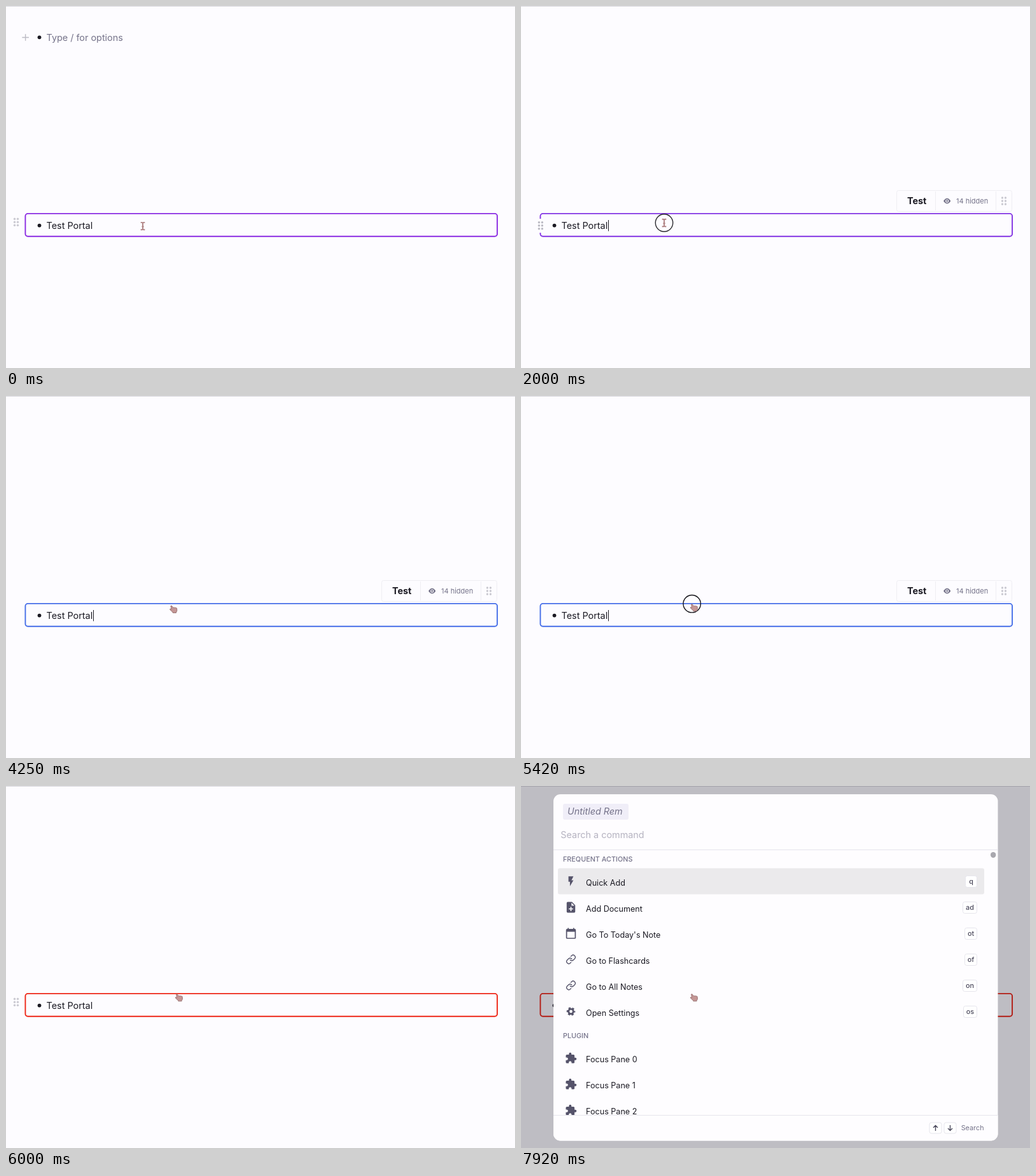
An HTML page that plays this animation: 800 by 570 pixels, repeating every 8 s.

```html
<!DOCTYPE html>
<html lang="en">
<head>
<meta charset="utf-8">
<style>
  html, body { margin: 0; width: 100%; height: 100%; overflow: hidden; background: #fdfcff; }
  svg { display: block; width: 800px; height: 570px; }
  text { font: 14.4px Inter, sans-serif; fill: #1b1a23; white-space: pre; }
  .row { font-size: 12.6px; }
  .small { font-size: 10.8px; fill: #75738a; }
  .head { font-size: 10.8px; font-weight: 500; fill: #75738a; }
  .key { font-size: 10.8px; font-weight: 500; fill: #4b495c; text-anchor: middle; }
  .box { fill: #fff; stroke: #e6e5ec; }
  .line { stroke: #e6e5ec; }
  .caret { stroke: #1b1a23; stroke-width: 1; }
  .icon { fill: #55536a; }
  .stroke { fill: none; stroke: #55536a; stroke-width: 2; stroke-linecap: round; }
</style>
</head>
<body>
<svg viewBox="0 0 800 570">
  <defs>
    <g id="dots">
      <circle cx="-2.5" cy="-5" r="1.7"/><circle cx="2.5" cy="-5" r="1.7"/>
      <circle cx="-2.5" r="1.7"/><circle cx="2.5" r="1.7"/>
      <circle cx="-2.5" cy="5" r="1.7"/><circle cx="2.5" cy="5" r="1.7"/>
    </g>
    <path id="bolt" class="icon" d="M7 2V13H10V22L17 10H13L17 2Z"/>
    <path id="doc" class="icon" d="M14 2H6a2 2 0 0 0-2 2v16a2 2 0 0 0 2 2h12a2 2 0 0 0 2-2V8zm2 14h-3v3h-2v-3H8v-2h3v-3h2v3h3zm-3-7V3.5L18.5 9z"/>
    <path id="calendar" class="icon" d="M19 4h-1V2h-2v2H8V2H6v2H5a2 2 0 0 0-2 2v14a2 2 0 0 0 2 2h14a2 2 0 0 0 2-2V6a2 2 0 0 0-2-2zm0 16H5V9h14z"/>
    <path id="link" class="stroke" d="M10 13a5 5 0 0 0 7.54.54l3-3a5 5 0 0 0-7.07-7.07l-1.72 1.71M14 11a5 5 0 0 0-7.54-.54l-3 3a5 5 0 0 0 7.07 7.07l1.71-1.71"/>
    <g id="gear" fill="none" stroke="#55536a">
      <circle cx="12" cy="12" r="5.4" stroke-width="4"/>
      <circle cx="12" cy="12" r="8.2" stroke-width="3" stroke-dasharray="4.6 3.99" stroke-dashoffset="2.3"/>
    </g>
    <path id="puzzle" class="icon" d="M20.5 11H19V7a2 2 0 0 0-2-2h-4V3.5a2.5 2.5 0 0 0-5 0V5H4a2 2 0 0 0-2 2v3.8h1.5a2.7 2.7 0 0 1 0 5.4H2V20a2 2 0 0 0 2 2h3.8v-1.5a2.7 2.7 0 0 1 5.4 0V22H17a2 2 0 0 0 2-2v-4h1.5a2.5 2.5 0 0 0 0-5z"/>
  </defs>

  <rect width="800" height="570" fill="#fdfcff"/>
  <rect width="800" height="1" fill="#dad9df"/>

  <g id="emptyLine">
    <path d="M25.3 49.5h10.6M30.6 44.2v10.6" stroke="#bcbbc4" stroke-width="1.4"/>
    <circle cx="52.5" cy="49.3" r="2.9" fill="#1b1a23"/>
    <text x="63.5" y="54.6" style="fill:#75738a">Type / for options</text>
  </g>
  <path id="topCaret" class="caret" d="M64.5 41v17"/>

  <rect id="portal" x="30.4" y="326.9" width="741.7" height="35.8" rx="4" fill="none" stroke-width="1.9"/>
  <use id="outerHandle" href="#dots" x="16" y="340.3" fill="#cac9d1"/>
  <g id="innerHandle">
    <rect x="24" y="335" width="13" height="22" fill="#fdfcff"/>
    <use href="#dots" x="30.8" y="345.8" fill="#bab9c2"/>
  </g>
  <circle cx="52.5" cy="345.6" r="2.9" fill="#1b1a23"/>
  <text x="63.5" y="351">Test Portal</text>
  <path id="portalCaret" class="caret" d="M137.5 337v17.5"/>

  <g id="toolbar">
    <rect x="590.5" y="290.5" width="181" height="33" rx="3" fill="#fdfcff" stroke="#efeef3"/>
    <path d="M651.5 292v30M746.5 292v30" stroke="#efeef3"/>
    <text x="607" y="312" font-weight="700" style="font-weight:700">Test</text>
    <path d="M664 307q5.7-8.6 11.4 0q-5.7 8.6-11.4 0z" fill="#75738a"/>
    <circle cx="669.7" cy="307" r="2" fill="#75738a" stroke="#fdfcff" stroke-width="1.1"/>
    <text x="684" y="311" class="small" style="font-size:11px">14 hidden</text>
    <use href="#dots" x="759" y="307" fill="#cac9d1"/>
  </g>

  <g id="palette">
    <rect width="800" height="570" fill="#000010" fill-opacity=".25"/>
    <rect x="51" y="13" width="698.5" height="545.5" rx="11" fill="#fefdff"/>
    <rect x="66" y="28" width="103" height="25" rx="3" fill="#f0eef8"/>
    <text x="73" y="45.4" style="font-style:italic;fill:#75738a">Untitled Rem</text>
    <text x="62.3" y="81.6" style="fill:#b5b3c0">Search a command</text>
    <path id="searchCaret" class="caret" d="M62.5 68v17.5"/>
    <path class="line" d="M51 100.5H749.5"/>
    <text x="66" y="119" class="head">FREQUENT ACTIONS</text>
    <rect x="58" y="129.5" width="670" height="41" rx="3" fill="#ebeaec"/>
    <rect x="738" y="104" width="8.4" height="9" rx="4.2" fill="#a9a8ae"/>
    <text x="66" y="397.4" class="head">PLUGIN</text>
    <g id="rows"></g>
    <path d="M51 518H749.5V547.5a11 11 0 0 1-11 11H62a11 11 0 0 1-11-11z" fill="#fefdff"/>
    <path class="line" d="M51 518.5H749.5"/>
    <rect class="box" x="642" y="530" width="19" height="17" rx="3"/>
    <rect class="box" x="665" y="530" width="19" height="17" rx="3"/>
    <path d="M651.5 543v-8.5m-3.5 3.5l3.5-3.5l3.5 3.5M674.5 534v8.5m-3.5-3.5l3.5 3.5l3.5-3.5" fill="none" stroke="#4b495c" stroke-width="1.4"/>
    <text x="691.7" y="542.4" class="small">Search</text>
  </g>

  <circle id="ring" r="13.7" fill="none" stroke="#15141a" stroke-width="1.4"/>
  <g id="pointer">
    <path id="beam" d="M-3.3-5.7h2q1.3 0 1.3 1.5q0-1.5 1.3-1.5h2M0-5V5M-3.3 5.7h2q1.3 0 1.3-1.5q0 1.5 1.3 1.5h2M-1.6 .8h3.2" fill="none" stroke="#b08384" stroke-width="1.9"/>
    <path id="hand" d="M-1.2.9q1.1-1.2 2.2.3l1.6 2.3q1-.9 2 0q1-.7 2 .2q1.3-.4 1.8.8l.3 3.3q-.1 1.6-1.2 2.5l-.1 1.3h-5.2l-.5-1.3l-4-3.6q-.6-1.5 1-1.4l1.3.4z" fill="#c49695" stroke="#936b6c" stroke-width=".9"/>
  </g>
</svg>
<script>
const $ = id => document.getElementById(id);
const show = (id, on) => { $(id).style.display = on ? '' : 'none'; };
const mix = (a, b, p) => a + (b - a) * p;
const progress = (t, from, to) => Math.min(1, Math.max(0, (t - from) / (to - from)));
const ease = p => p * p * (3 - 2 * p);
const blink = (t, start) => Math.floor((t - start) / 500) % 2 === 0;

const LOOP = 8000, FOCUS = 1915, PRESS = 5245, SELECT = 5490, OPEN = 7245;
const VIOLET = [138, 43, 226], BLUE = [70, 110, 232], RED = [238, 38, 22];

// center y, label, icon, icon scale, shortcut, shortcut box width
const rows = [
  [152, 'Quick Add', 'bolt', .78, 'q', 18],
  [193, 'Add Document', 'doc', .84, 'ad', 22],
  [234, "Go To Today's Note", 'calendar', .86, 'ot', 19],
  [275, 'Go to Flashcards', 'link', .68, 'of', 19],
  [316, 'Go to All Notes', 'link', .68, 'on', 22],
  [357, 'Open Settings', 'gear', .7, 'os', 21],
  [430.5, 'Focus Pane 0', 'puzzle', .8],
  [471.5, 'Focus Pane 1', 'puzzle', .8],
  [512.5, 'Focus Pane 2', 'puzzle', .8]
];
$('rows').innerHTML = rows.map(([y, label, icon, scale, key, width]) => `
  <use href="#${icon}" transform="translate(78.5 ${y - 2}) scale(${scale}) translate(-12 -12)"/>
  <text x="102" y="${y + 4.7}" class="row">${label}</text>` + (key ? `
  <rect class="box" x="${716.5 - width}" y="${y - 10.5}" width="${width}" height="18" rx="3"/>
  <text x="${716.5 - width / 2}" y="${y + 2.3}" class="key">${key}</text>` : '')).join('');

function draw(t) {
  const focused = t >= FOCUS && t < SELECT;
  const open = t >= OPEN;

  const tint = t < SELECT
    ? [VIOLET, BLUE, ease(progress(t, FOCUS - 30, FOCUS + 500))]
    : [BLUE, RED, ease(progress(t, SELECT, SELECT + 500))];
  const color = tint[0].map((c, i) => Math.round(mix(c, tint[1][i], tint[2])));
  $('portal').setAttribute('stroke', `rgb(${color})`);

  const first = ease(progress(t, 0, 1000));
  const second = ease(progress(t, 3200, 4670));
  const x = mix(mix(215, 225, first), 268.7, second);
  const y = mix(mix(346.6, 341.5, first) - (t >= 2745 ? 1 : 0), 327.2, second);
  const onEdge = y < 330;
  $('pointer').setAttribute('transform', `translate(${x} ${y})`);
  show('beam', !onEdge);
  show('hand', onEdge);

  const pressed = t < 4000
    ? (t >= FOCUS) * (1 - progress(t, FOCUS, FOCUS + 500) ** 1.3)
    : (t >= PRESS) * (1 - progress(t, SELECT, SELECT + 170));
  $('ring').setAttribute('opacity', pressed);
  $('ring').setAttribute('cx', x);
  $('ring').setAttribute('cy', y);

  show('emptyLine', t < FOCUS);
  show('topCaret', t < FOCUS && !blink(t, 0));
  show('outerHandle', t < FOCUS || (t >= SELECT && !open));
  show('innerHandle', focused && t < 3830);
  show('toolbar', focused);
  show('portalCaret', focused && blink(t, FOCUS + 12));
  show('palette', open);
  show('searchCaret', blink(t, OPEN));
}

function tick() {
  draw(performance.now() % LOOP);
  requestAnimationFrame(tick);
}
tick();
</script>
</body>
</html>
```
